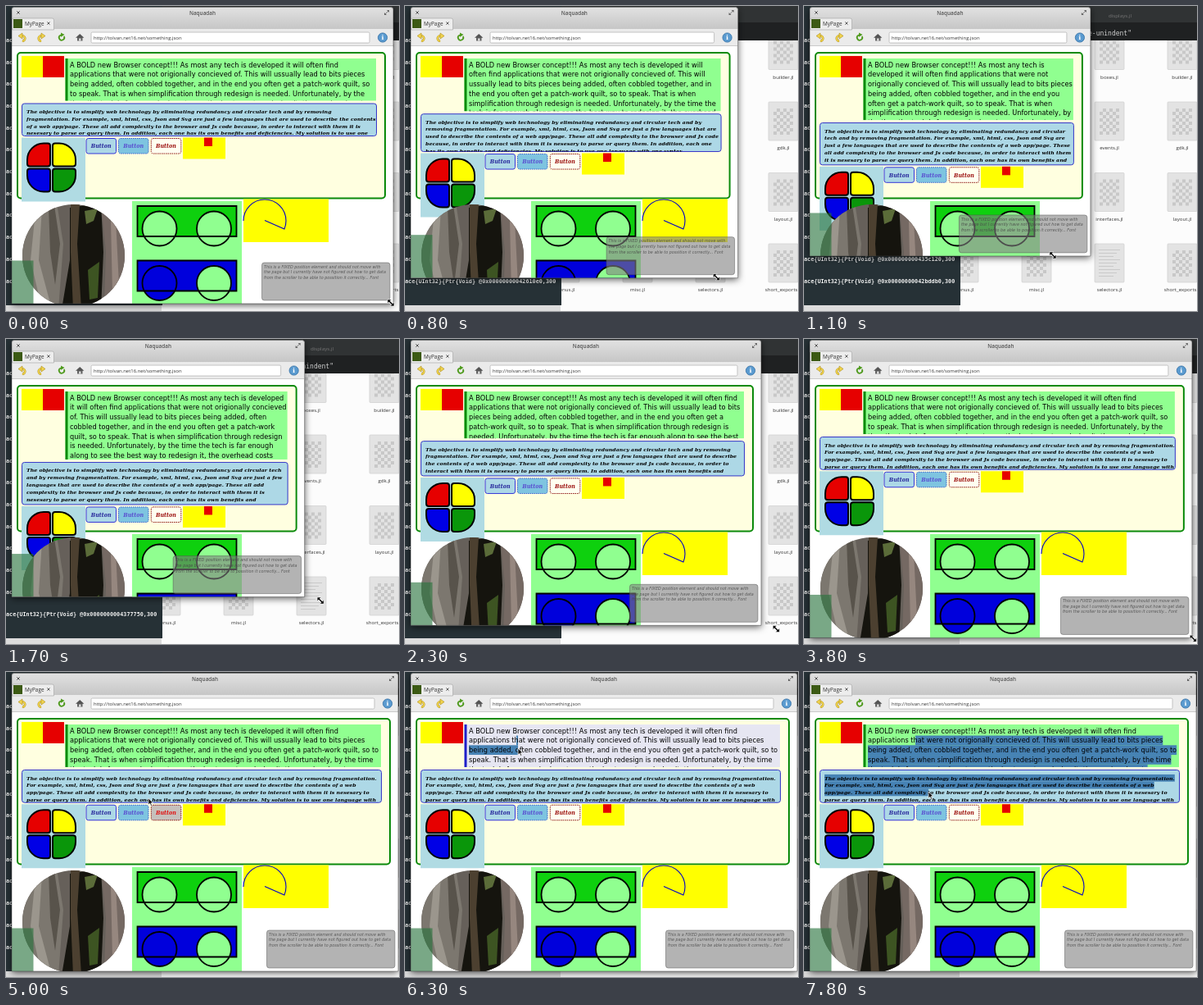
An HTML page with a canvas for the animation above (8 s loop, 480 px wide and 372 px high).

```html
<!DOCTYPE html>
<html lang="en">
<head>
<meta charset="utf-8">
<title>Browser window</title>
<style>
html, body { margin: 0; width: 100%; height: 100%; overflow: hidden; }
canvas { display: block; }
</style>
</head>
<body>
<canvas id="stage" width="480" height="372"></canvas>
<script>
const c = document.getElementById('stage').getContext('2d');
const SANS = '"DejaVu Sans", sans-serif', SERIF = '"DejaVu Serif", serif';
const MONO = '"DejaVu Sans Mono", monospace', UI = '"Open Sans", sans-serif';
const LIGHT = '#90ff90', SELECT = '#4682b4';

const intro = 'A BOLD new Browser concept!!! As most any tech is developed it will often find applications that were not origionally concieved of. This will ussually lead to bits pieces being added, often cobbled together, and in the end you often get a patch-work quilt, so to speak. That is when simplification through redesign is needed. Unfortunately, by the time the tech is far enough along to see the best way to redesign it, the overhead costs';
const goal = 'The objective is to simplify web technology by eliminating redundancy and circular tech and by removing fragmentation. For example, xml, html, css, Json and Svg are just a few languages that are used to describe the contents of a web app/page. These all add complexity to the browser and Js code because, in order to interact with them it is nesesary to parse or query them. In addition, each one has its own benefits and deficiencies. My solution is to use one language with one syntax';
const note = ['This is a FIXED position element and should not move with',
  'the page but I currently have not figured out how to get data',
  'from the scroller to be able to possition it correctly... Font'];

// time, window right edge, window bottom edge, intro height
const sizeKeys = [[0, 473, 363, 51.5], [450, 473, 363, 51.5], [1100, 350, 305, 75],
  [1400, 318, 293, 87], [1700, 364.5, 314.5, 83], [2200, 430, 347, 58], [2900, 464.5, 363, 52],
  [3150, 464.5, 363, 52], [3400, 470, 364, 52], [3650, 470, 364, 52], [4000, 479, 365, 52]];
// time, pointer x, pointer y
const mouseKeys = [[0, 470, 362], [450, 470, 362], [1100, 304, 304], [1350, 296, 290],
  [1700, 384, 319], [2200, 450, 352], [2900, 473, 363], [3650, 474, 364], [4000, 477, 367],
  [4350, 477, 367], [4850, 197, 172], [5000, 174, 154], [5200, 140, 158], [5400, 136, 108],
  [5800, 136, 81], [6100, 136, 81], [6300, 138, 93], [6900, 150, 108], [7800, 152, 146]];

function at(keys, t) {
  const i = keys.findIndex(k => k[0] > t);
  if (i < 0) return keys[keys.length - 1].slice(1);
  const a = keys[i - 1], b = keys[i], u = (t - a[0]) / (b[0] - a[0]);
  return a.slice(1).map((v, j) => v + (b[j + 1] - v) * u);
}

// Fonts are set ten times larger and scaled down for even letter spacing.
const setFont = (size, family, style = '') => { c.font = `${style} ${size * 10}px ${family}`; };

function text(s, x, y, size, color, family = UI, style = '', align = 'left') {
  c.save();
  c.translate(x, y);
  c.scale(.1, .1);
  setFont(size, family, style);
  c.textAlign = align;
  c.fillStyle = color;
  c.fillText(s, 0, 0);
  c.restore();
}

function wrap(s, width, size, family, style) {
  setFont(size, family, style);
  const lines = [];
  let line = '';
  for (const word of s.split(' ')) {
    const next = line ? line + ' ' + word : word;
    if (line && c.measureText(next).width / 10 > width) {
      lines.push(line);
      line = word;
    } else line = next;
  }
  return [...lines, line];
}

function paragraph(s, x, y, right, size, lead, family, style, band) {
  wrap(s, right - x, size, family, style).forEach((line, i) => {
    const base = y + i * lead;
    setFont(size, family, style);
    const span = band(i, x + c.measureText(line).width / 10);
    if (span) rect(span[0], base - lead * .75, span[1] - span[0], lead, SELECT);
    text(line, x, base, size, '#000', family, style);
  });
}

function rect(x, y, w, h, color) {
  c.fillStyle = color;
  c.fillRect(x, y, w, h);
}

function box(x, y, w, h, r, fill, stroke, line = 1, dash = []) {
  c.beginPath();
  c.roundRect(x, y, w, h, r);
  paint(fill, stroke, line, dash);
}

function disc(x, y, r, fill, stroke, line) {
  c.beginPath();
  c.arc(x, y, r, 0, 7);
  paint(fill, stroke, line);
}

function shape(points, fill, stroke, line) {
  c.beginPath();
  for (let i = 0; i < points.length; i += 2) c.lineTo(points[i], points[i + 1]);
  if (fill) c.closePath();
  paint(fill, stroke, line);
}

function paint(fill, stroke, line = 1, dash = []) {
  if (fill) { c.fillStyle = fill; c.fill(); }
  if (!stroke) return;
  c.strokeStyle = stroke;
  c.lineWidth = line;
  c.setLineDash(dash);
  c.stroke();
  c.setLineDash([]);
}

function clipped(x, y, w, h, draw) {
  c.save();
  c.beginPath();
  c.rect(x, y, w, h);
  c.clip();
  draw();
  c.restore();
}

function desktop(t) {
  rect(0, 0, 480, 372, '#fcfcfc');
  const rows = [['', '', 'boxes.jl', 'builder.jl'], ['', '', 'events.jl', 'gdk.jl'],
    ['', '', 'interfaces.jl', 'layout.jl'], ['menus.jl', 'misc.jl', 'selectors.jl', 'short_exports.jl']];
  rows.forEach((row, j) => row.forEach((name, i) => {
    if (!name) return;
    const x = 195 + i * 89, y = 30.5 + j * 86.5;
    box(x - 18, y, 36, 47, 1, '#e3e3e3', '#cfcfcf', .7);
    if (name == 'selectors.jl') {
      for (let k = 0; k < 9; k++) rect(x - 13, y + 7 + k * 4, 26 - k % 3 * 4, .8, '#c4c4c4');
    } else {
      for (let k = 0; k < 48; k++)
        if ((k + (k / 6 | 0)) % 2) rect(x - 12 + k % 6 * 4, y + 8 + (k / 6 | 0) * 4, 4, 4, '#c8c8c8');
    }
    text(name, x, y + 58, 6.2, '#333', UI, '', 'center');
  }));

  rect(190, 0, 290, 42, '#1f2122');
  rect(190, 0, 290, 20, '#303334');
  text('displays.jl', 386, 14, 6.2, '#777', UI, '', 'center');
  text('"toggle-unindent"', 400, 36, 8, '#d0d0d0', MONO, '', 'right');

  rect(0, 365, 190, 7, '#dcdcdc');
  rect(0, 0, 191, 365, '#263136');
  const tick = Math.floor(t / 100);
  for (let k = 0; k < 12; k++) {
    const address = (0x4169960 + (tick * 7919 + k * 40503) % 0x400000 * 16 % 0x400000).toString(16).padStart(16, '0');
    text(`ace{UInt32}{Ptr{Void} @0x${address},300`, 0, 337.5 - k * 26.7, 6.8, '#eee', MONO, 'bold');
  }
}

function curl(x, color, edge) {
  c.beginPath();
  c.arc(x, 39.5, 3.2, -1.8, 1.6);
  paint(null, edge, 2.6);
  paint(null, color, 1.6);
  shape([x - 5, 36.5, x, 33, x, 40], color, edge, .6);
}

function chrome(R, B) {
  c.save();
  c.shadowColor = 'rgba(0,0,0,.65)';
  c.shadowBlur = 9;
  c.shadowOffsetY = 2;
  box(7, 1.5, R - 7, B - 1.5, [3, 3, 0, 0], '#fff');
  c.restore();
  const mid = (7 + R) / 2, g = c.createLinearGradient(0, 1, 0, 28);
  g.addColorStop(0, '#e2e2e2');
  g.addColorStop(1, '#c6c6c6');
  box(7, 1.5, R - 7, 27, [3, 3, 0, 0], g);
  rect(7, 28, R - 7, 21, '#ebebeb');
  rect(7, 48, R - 7, .8, '#c2c2c2');
  text('Naquadah', mid, 10.5, 6.4, '#555', UI, '600', 'center');
  shape([13.3, 6.3, 16.7, 9.7], null, '#555', 1);
  shape([16.7, 6.3, 13.3, 9.7], null, '#555', 1);
  shape([R - 10.5, 10.5, R - 5.5, 5.5], null, '#666', .8);
  shape([R - 8, 5, R - 5, 5, R - 5, 8], '#666');
  shape([R - 11, 8, R - 11, 11, R - 8, 11], '#666');

  box(7.5, 15, 51, 14, [2, 2, 0, 0], '#ededed', '#aaa', .7);
  rect(9, 16, 11, 11, '#3c5a14');
  text('MyPage', 23, 24, 6.4, '#333');
  shape([50.3, 19.5, 53.5, 22.7], null, '#555', 1);
  shape([53.5, 19.5, 50.3, 22.7], null, '#555', 1);

  curl(20, '#f2d550', '#a98a16');
  c.save();
  c.translate(86, 0);
  c.scale(-1, 1);
  curl(43, '#f2d550', '#a98a16');
  c.restore();
  c.beginPath();
  c.arc(68, 38.5, 3.2, -.5, 4.6);
  paint(null, '#4e9a1c', 1.8);
  shape([67, 32.5, 71.5, 35, 67, 37.7], '#4e9a1c');
  rect(87, 38, 6.5, 4.5, '#666');
  shape([85, 38.8, 90.2, 34, 95.4, 38.8], '#555');
  rect(89.3, 39.5, 2, 3, '#eee');
  box(104, 32, R - 133, 13, 1.5, '#fff', '#b5b5b5', .8);
  text('http://tolvan.net16.net/something.json', 107, 40.8, 5.95, '#333');
  disc(R - 13, 38.5, 5.6, '#5b9bd0', '#2f6ca3', .8);
  text('i', R - 13, 41.3, 8, '#fff', SERIF, 'bold', 'center');
}

function photo() {
  c.save();
  c.beginPath();
  c.arc(82.5, 304.5, 62.5, 0, 7);
  c.clip();
  rect(20, 240, 126, 130, '#66605a');
  shape([20, 240, 62, 240, 70, 290, 64, 370, 20, 370], '#7c776f');
  shape([36, 250, 44, 246, 40, 310, 56, 370, 44, 370, 30, 310], '#9b968d');
  shape([52, 244, 59, 243, 66, 290, 60, 340, 54, 300], '#58534b');
  shape([78, 246, 116, 240, 119, 300, 116, 370, 68, 370, 78, 310], '#15140e');
  shape([79, 242, 90, 242, 87, 290, 92, 370, 82, 370, 79, 300], '#4c4030');
  shape([96, 250, 112, 247, 107, 262, 98, 266], '#5b6c39');
  shape([100, 322, 114, 312, 112, 356, 102, 358], '#3d5422');
  shape([116, 240, 146, 240, 146, 370, 120, 370, 122, 300], '#756963');
  shape([128, 262, 134, 260, 138, 340, 130, 350], '#96877f');
  c.restore();
}

function figure(y, color, left) {
  box(160.5, y, 121, 37, 0, color);
  disc(187.5, y + 27.5, 21, left);
  disc(254, y + 27.5, 21, LIGHT);
  box(160.5, y, 121, 37, 0, null, '#000', 1.8);
  for (const x of [187.5, 254]) disc(x, y + 27.5, 21, null, '#000', 1.8);
}

function button(x, y, fill, border, color, dash) {
  box(x, y, 36.5, 18.5, 2.5, fill, border, 1, dash);
  text('Button', x + 18.2, y + 11.8, 6.4, color, SERIF, 'italic bold', 'center');
}

function page(t, R, B, h, mx, my) {
  const right = R - 21, dragging = t >= 6100;
  const inIntro = t > 4400 && my > 64 && my < 116 && mx > 72;
  box(14, 57, R - 24, 177.5, 4, '#ffffe0', '#0a8a0a', 2);
  rect(19, 61, 26, 26, '#ff0');
  rect(45, 61, 26, 26, '#e60000');

  rect(72.5, 64, right - 72.5, h, inIntro ? '#e6e6f2' : LIGHT);
  rect(72.5, 64, 3, h, inIntro ? '#2020c8' : '#0a8a0a');
  const row = Math.floor((my - 64) / 11.75), last = inIntro ? row : 99;
  clipped(72, 64, right - 70, h, () =>
    paragraph(intro, 78, 74.6, right, 8.24, 11.75, SANS, '', (i, end) => {
      if (!dragging || i < 1 || i > last) return;
      const from = i == 1 ? 136 : 78;
      return [from, i == last || i == 1 && inIntro ? Math.max(mx, from + 2) : end];
    }));

  const top = 67.5 + h, tall = 39.5 + Math.min(12, (h - 51.5) / 2), foot = top + tall;
  box(19.5, top, right - 19, tall, 3, '#add8e6', '#3535c8', 1);
  const goalRow = Math.floor((my - 122) / 8.8);
  clipped(20, top, right - 19, tall, () =>
    paragraph(goal, 25, top + 12, right, 6.3, 8.8, SERIF, 'italic bold', (i, end) =>
      dragging && !inIntro && i <= goalRow ? [25, i < goalRow ? end : mx] : null));

  const y = foot + 2;
  rect(19, y, 78, 78, '#b0dbe3');
  box(26, y + 7, 28, 28, [20, 3, 3, 3], '#e60000', '#000', 2);
  box(57, y + 7, 28, 28, [3, 20, 3, 3], '#ff0', '#000', 2);
  box(26, y + 38, 28, 28, [3, 3, 3, 20], '#0000e6', '#000', 2);
  box(57, y + 38, 28, 28, [3, 3, 20, 3], '#0a960a', '#000', 2);
  const hover = t > 4780 && t < 5150;
  button(98, y + 1, '#add8e6', '#3535d8', '#28289c');
  button(137.5, y + 1, '#7ec4e0', '#3a60d0', '#5a4fd0', [1.5, 1]);
  button(177.3, y + 1, hover ? '#c6c0bc' : '#fffff0', '#8b1010', hover ? '#e01010' : '#9c1010', [1.5, 1]);
  rect(216, y, 52, 26, '#ff0');
  rect(242, y, 10, 10.5, '#e60000');

  photo();
  rect(154, 238, 134, 134, LIGHT);
  figure(244, '#0ed00e', LIGHT);
  figure(310.5, '#0000dc', '#0000dc');
  if (R > 404) {
    rect(290, 235.5, 104, 52.5, '#ff0');
    c.beginPath();
    c.arc(316, 262, 26, Math.PI, Math.PI * 2 + .4);
    c.lineTo(316, 261.5);
    paint(null, '#0000c8', 1.1);
  }
  rect(7, B - 52.5, 26.5, 52.5, 'rgba(40,115,60,.62)');
  box(R - 160.5, B - 50, 156.5, 46, 3, 'rgba(128,128,128,.6)', 'rgba(80,80,80,.6)', .8);
  note.forEach((s, i) => text(s, R - 158, B - 43.2 + i * 6.6, 4.85, 'rgba(70,70,70,.85)', SANS, 'italic'));
}

function pointer(t, x, y) {
  c.save();
  c.translate(x, y);
  if (t < 4400) {
    shape([-2.5, -2.5, 2.5, 2.5], null, '#fff', 3);
    shape([-4, -4, .8, -4, -4, .8], '#000', '#fff', .6);
    shape([4, 4, -.8, 4, 4, -.8], '#000', '#fff', .6);
    shape([-3, -3, 3, 3], null, '#000', 1.4);
  } else {
    shape([0, 0, 0, 8, 1.9, 6.3, 3.2, 9.2, 4.6, 8.6, 3.3, 5.8, 5.8, 5.6], '#111', '#fff', .7);
  }
  c.restore();
}

function frame(now) {
  const t = now % 8000;
  const [R, B, h] = at(sizeKeys, t), [mx, my] = at(mouseKeys, t);
  desktop(t);
  chrome(R, B);
  clipped(7, 49, R - 7, B - 49, () => page(t, R, B, h, mx, my));
  box(7, 1.5, R - 7, B - 1.5, [3, 3, 0, 0], null, 'rgba(60,60,60,.6)', .8);
  pointer(t, mx, my);
  requestAnimationFrame(frame);
}
requestAnimationFrame(frame);
</script>
</body>
</html>
```
